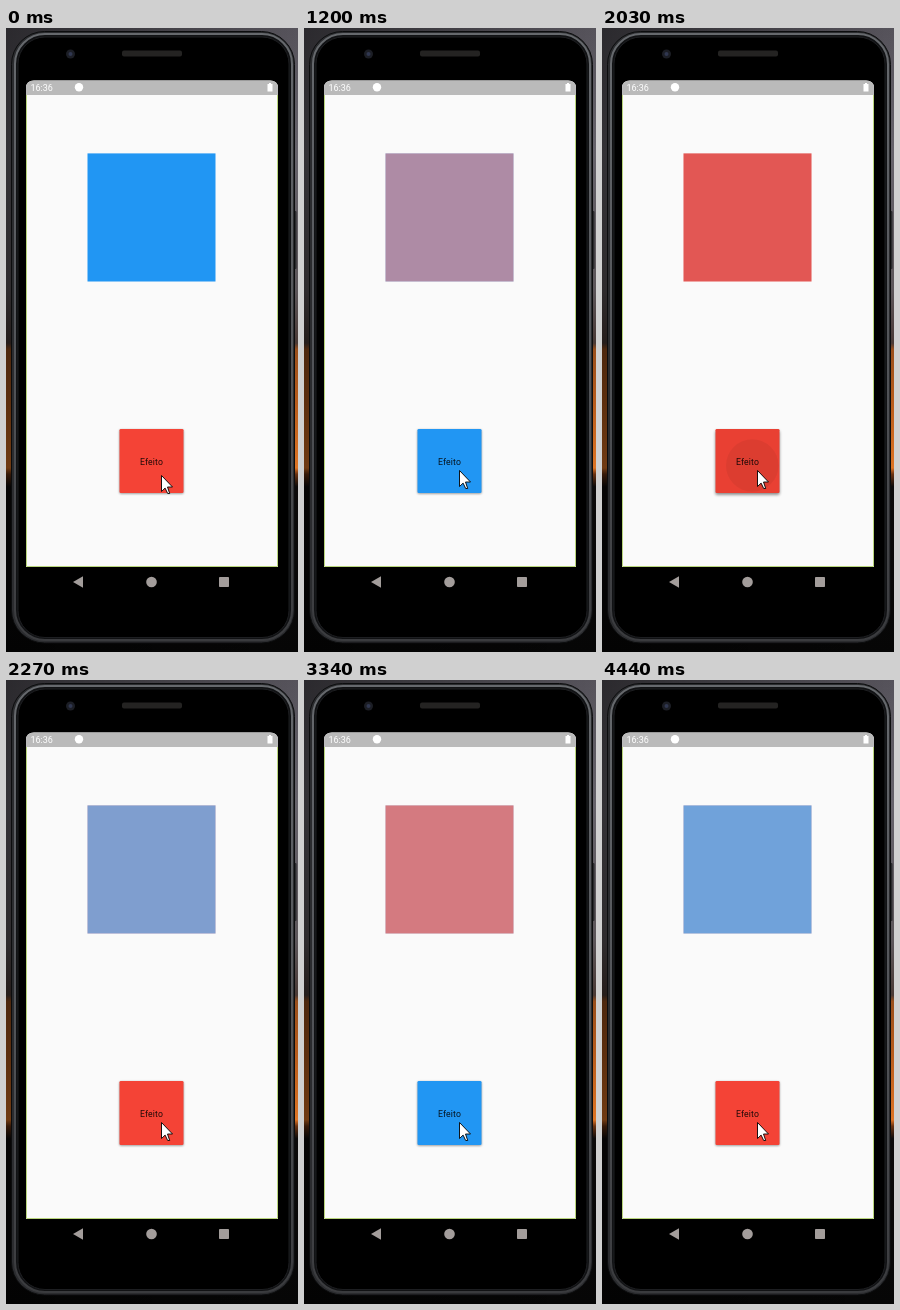
An HTML page for the animation above (4.51 s loop, 292 by 624 pixels).

```html
<!DOCTYPE html>
<html lang="pt">
<head>
<meta charset="utf-8">
<title>Efeito</title>
<style>
  html, body { margin: 0; width: 100%; height: 100%; overflow: hidden; background: #000; }
  svg { display: block; width: 100vw; height: 100vh; }
  text { font-family: Roboto, sans-serif; }
</style>
</head>
<body>
<svg viewBox="0 0 292 624" preserveAspectRatio="none">
  <defs>
    <linearGradient id="sky" x2="0" y2="1">
      <stop offset="0" stop-color="#56535b"/>
      <stop offset=".2" stop-color="#66636b"/>
      <stop offset=".42" stop-color="#5c565a"/>
      <stop offset=".505" stop-color="#4a3a36"/>
      <stop offset=".515" stop-color="#9a4f1c"/>
      <stop offset=".6" stop-color="#b85c1c"/>
      <stop offset=".705" stop-color="#de7424"/>
      <stop offset=".715" stop-color="#6b3210"/>
      <stop offset=".735" stop-color="#0c0a0a"/>
      <stop offset="1" stop-color="#060606"/>
    </linearGradient>
    <linearGradient id="shade">
      <stop offset="0" stop-color="#000" stop-opacity=".5"/>
      <stop offset="1" stop-color="#000" stop-opacity="0"/>
    </linearGradient>
    <linearGradient id="rim" x2="0" y2="1">
      <stop offset="0" stop-color="#66696d"/>
      <stop offset=".6" stop-color="#505256"/>
      <stop offset="1" stop-color="#3a3b3e"/>
    </linearGradient>
    <clipPath id="screen"><path d="M20 539V60q0-7.5 8-7.5H264q8 0 8 7.5V539z"/></clipPath>
    <clipPath id="face"><rect x="113.5" y="401" width="64" height="64" rx="1.3"/></clipPath>
    <filter id="soft" x="-30%" y="-30%" width="160%" height="160%"><feGaussianBlur id="blur"/></filter>
  </defs>

  <rect width="292" height="624" fill="url(#sky)"/>
  <rect width="292" height="624" fill="url(#shade)"/>

  <!-- phone body -->
  <rect x="287" y="183" width="3.5" height="58" rx="1" fill="#2a2a2d"/>
  <rect x="5.5" y="3.5" width="283" height="611.5" rx="33" fill="#2b2c2f" stroke="#0c0d0e"/>
  <rect x="9" y="6" width="277" height="606" rx="30" fill="#111214" stroke="url(#rim)" stroke-width="2"/>
  <rect x="12" y="9" width="271" height="600.5" rx="27" fill="#000" stroke="#1d1e21"/>
  <rect x="116" y="22.5" width="60" height="6" rx="2" fill="#242322"/>
  <circle cx="64.5" cy="26" r="4.5" fill="#1c1e25"/>
  <circle cx="64.5" cy="26" r="2" fill="#303750"/>

  <!-- screen -->
  <g clip-path="url(#screen)">
    <rect x="20" y="52" width="252" height="487" fill="#fafafa"/>
    <path d="M20.5 67V538.5H271.5V67" fill="none" stroke="#b9d57c"/>
    <rect x="20" y="52" width="252" height="15" fill="#bababa"/>
  </g>
  <text x="24.5" y="62.8" font-size="9" fill="#fff">16:36</text>
  <circle cx="73" cy="59.3" r="4.2" fill="#fff"/>
  <path d="M261.5 56h1.5v-1h2v1h1.5v7.5h-5z" fill="#fff"/>

  <g fill="#a39d9b">
    <path d="M67 554L77 548.3V559.7z"/>
    <circle cx="145.5" cy="554" r="5.3"/>
    <rect x="213" y="549" width="10" height="10" rx=".8"/>
  </g>

  <!-- cross-fading square -->
  <rect id="under" x="81.5" y="125.4" width="128" height="128.1"/>
  <rect id="over" x="81.5" y="125.4" width="128" height="128.1"/>

  <!-- button -->
  <rect id="shadow" x="113.5" y="401" width="64" height="64" rx="1.3" filter="url(#soft)"/>
  <g clip-path="url(#face)">
    <rect id="fill" x="113" y="400" width="65" height="66"/>
    <rect id="tint" x="113" y="400" width="65" height="66"/>
    <circle id="splash"/>
  </g>
  <text x="145.5" y="436.6" font-size="8.7" letter-spacing=".16" text-anchor="middle" fill-opacity=".87">Efeito</text>

  <path id="cursor" d="M0 0V16L3.6 12.6L6.2 18H8.2L6 11.5H11z" fill="#fff" stroke="#000" stroke-width=".9" stroke-linejoin="round"/>
</svg>
<script>
const LOOP = 4510;
const BLUE = '#2196f3', RED = '#f44336';

// down: press starts, seen: first visible, up: release and colour swap, end: fade complete
const taps = [
  { down: 910, seen: 1000, up: 1000, end: 1480 },
  { down: 1855, seen: 1890, up: 1990, end: 2495 },
  { down: 2925, seen: 2960, up: 3035, end: 3540 },
  { down: 4025, seen: 4060, up: 4125, end: 4630 }
];

const $ = id => document.getElementById(id);
const clamp = v => Math.max(0, Math.min(1, v));
const mix = (a, b, p) => a + (b - a) * p;
const easeOut = p => 1 - (1 - p) ** 2;
const set = (id, attrs) => {
  for (const key in attrs) $(id).setAttribute(key, attrs[key]);
};

function drawSquare(t, swaps) {
  const last = taps[swaps - 1];
  const p = last ? clamp((t - last.up) / (last.end - last.up)) : 1;
  const red = swaps % 2 === 1;
  set('under', { fill: red ? BLUE : RED, opacity: 1 - p });
  set('over', { fill: red ? RED : BLUE, opacity: p });
}

function drawButton(t, swaps) {
  const tap = taps.filter(k => t >= k.seen).pop();
  let press = 0, lift = 0, spread = 0, fade = 0;
  if (tap) {
    const held = clamp((Math.min(t, tap.up) - tap.down) / 200);
    const gone = clamp((t - tap.up) / 200);
    press = held * (1 - gone);
    lift = easeOut(held) * (1 - easeOut(gone));
    spread = clamp((t - tap.up) / 75);
    fade = 1 - gone;
  }
  set('fill', { fill: swaps % 2 ? BLUE : RED });
  set('tint', { opacity: 0.09 * press });
  set('splash', {
    cx: mix(156, 145.5, spread), cy: mix(443, 433, spread),
    r: 48 * spread, opacity: 0.07 * fade
  });
  set('shadow', { y: 401 + mix(0.8, 2.6, lift), opacity: mix(0.42, 0.5, lift) });
  set('blur', { stdDeviation: mix(0.8, 2, lift) });
}

function drawCursor(t) {
  const steps = t < 100 ? 0 : Math.min(5, 1 + Math.floor((t - 100) / 35));
  set('cursor', { transform: `translate(155.5 ${447.5 - steps})` });
}

function draw(t) {
  const swaps = taps.filter(k => t >= k.up).length;
  drawSquare(t, swaps);
  drawButton(t, swaps);
  drawCursor(t);
}

const start = performance.now();
function tick() {
  draw((performance.now() - start) % LOOP);
  requestAnimationFrame(tick);
}
tick();
</script>
</body>
</html>
```
